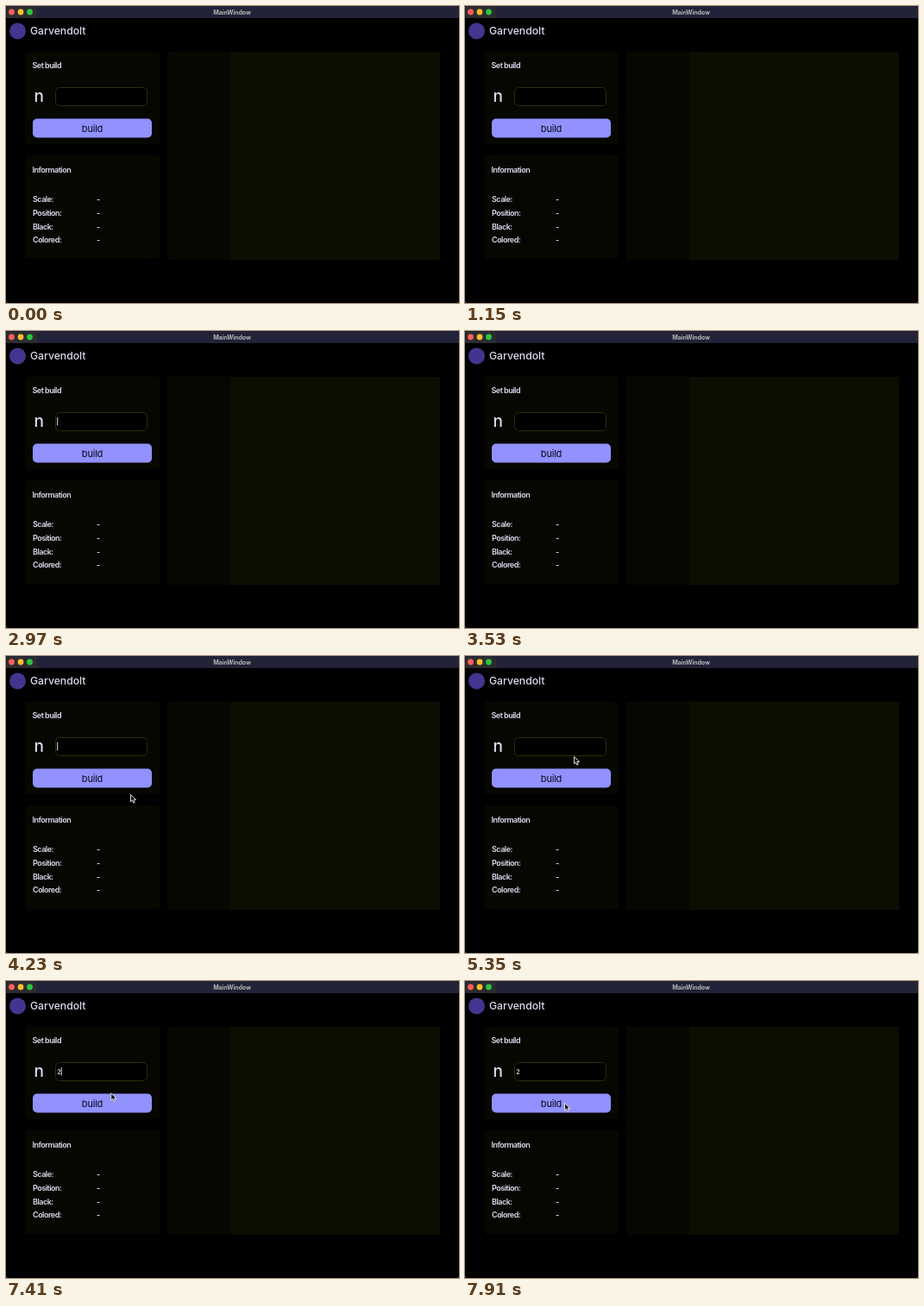
An HTML page that plays this animation: 525 by 344 pixels, repeating every 8000 ms.

```html
<!DOCTYPE html>
<html lang="en">
<head>
<meta charset="utf-8">
<title>MainWindow</title>
<style>
  html, body { margin: 0; width: 100%; height: 100%; overflow: hidden; background: #2c2c3c; }
  svg { display: block; width: 525px; height: 344px; }
  text { font-family: Inter, Roboto, sans-serif; fill: #dcdcf0; }
  .label { font-size: 9px; font-weight: 600; letter-spacing: -.5px; }
  .panel { fill: #070701; }
</style>
</head>
<body>
<svg viewBox="0 0 525 344">
  <rect width="525" height="344" rx="4"/>
  <path d="M0 14V4Q0 0 4 0H521Q525 0 525 4V14Z" fill="#222238"/>
  <rect x="1" y="1" width="35" height="13" fill="#2c2c30"/>
  <circle cx="6.5" cy="7" r="3.4" fill="#ff5f57"/>
  <circle cx="17" cy="7" r="3.4" fill="#febc2e"/>
  <circle cx="27.5" cy="7" r="3.4" fill="#28c840"/>
  <text x="262" y="9.7" text-anchor="middle" font-size="7" font-weight="700" letter-spacing="-.1" style="fill:#b4b4b4">MainWindow</text>

  <circle cx="13.5" cy="29" r="9.5" fill="#43358f"/>
  <text x="28" y="33" font-size="12.2" font-weight="500">Garvendolt</text>

  <rect class="panel" x="22" y="53" width="156" height="107" rx="4"/>
  <rect class="panel" x="22" y="173" width="156" height="120" rx="4"/>
  <rect class="panel" x="187" y="53" width="316" height="241"/>
  <rect x="260" y="53" width="243" height="241" fill="#0d0d02"/>

  <text class="label" x="30.5" y="71.5">Set build</text>
  <text x="32.5" y="111" font-size="19" font-weight="500">n</text>
  <rect x="57.5" y="94.5" width="106" height="21" rx="5" stroke="#2c2c0a"/>
  <rect x="31" y="130.5" width="138" height="22" rx="5" fill="#9191ff"/>
  <text x="100" y="145.7" text-anchor="middle" font-size="11" letter-spacing="-.2" style="fill:#08081c">build</text>

  <text class="label" x="30.5" y="192.5">Information</text>
  <g id="rows"></g>

  <text id="digit" x="59.2" y="108" font-size="7" font-weight="600">2</text>
  <rect id="caret" y="100" width="1" height="9.5" fill="#dcdcf0"/>
  <path id="pointer" d="M.5 .5V8.8L2.4 7.1 3.7 10.2 5.2 9.5 3.9 6.6H6.6Z" fill="#111" stroke="#eee" stroke-width=".9" stroke-linejoin="round"/>
</svg>
<script>
const LOOP = 8000, FOCUS_AT = 1790, TYPE_AT = 6100;
const get = id => document.getElementById(id);
const digit = get('digit'), caret = get('caret'), pointer = get('pointer');

get('rows').innerHTML = ['Scale:', 'Position:', 'Black:', 'Colored:'].map((name, i) => {
  const y = 227 + i * 15.8;
  return `<text class="label" x="31" y="${y}">${name}</text><text class="label" x="105" y="${y}">-</text>`;
}).join('');

// Visible pointer journeys: [time, x, y]; it disappears over the text field.
const journeys = [
  [[1290, 277, 272], [1790, 115, 112]],
  [[3710, 150, 116], [3830, 243, 301], [4230, 144, 160], [4600, 138, 146], [5350, 126, 116], [5450, 124, 110]],
  [[7170, 126, 117], [7600, 118, 138], [7910, 115, 141], [8000, 115, 141]]
];

const show = (el, on) => el.setAttribute('visibility', on ? 'visible' : 'hidden');
const ease = p => p * p * (3 - 2 * p);

function pointerAt(t) {
  const path = journeys.find(j => t >= j[0][0] && t < j[j.length - 1][0]);
  if (!path) return null;
  const i = path.findIndex(point => point[0] > t);
  const [t0, x0, y0] = path[i - 1], [t1, x1, y1] = path[i];
  const p = ease((t - t0) / (t1 - t0));
  return [x0 + (x1 - x0) * p, y0 + (y1 - y0) * p];
}

function draw(t) {
  const typed = t >= TYPE_AT;
  const blinkStart = typed ? TYPE_AT : FOCUS_AT;
  show(digit, typed);
  show(caret, t >= FOCUS_AT && (t - blinkStart) % 1000 < 500);
  caret.setAttribute('x', typed ? 63.7 : 59.2);

  const spot = pointerAt(t);
  show(pointer, spot);
  if (spot) pointer.setAttribute('transform', `translate(${spot})`);
}

const start = performance.now();
function frame() {
  draw((performance.now() - start) % LOOP);
  requestAnimationFrame(frame);
}
frame();
</script>
</body>
</html>
```
